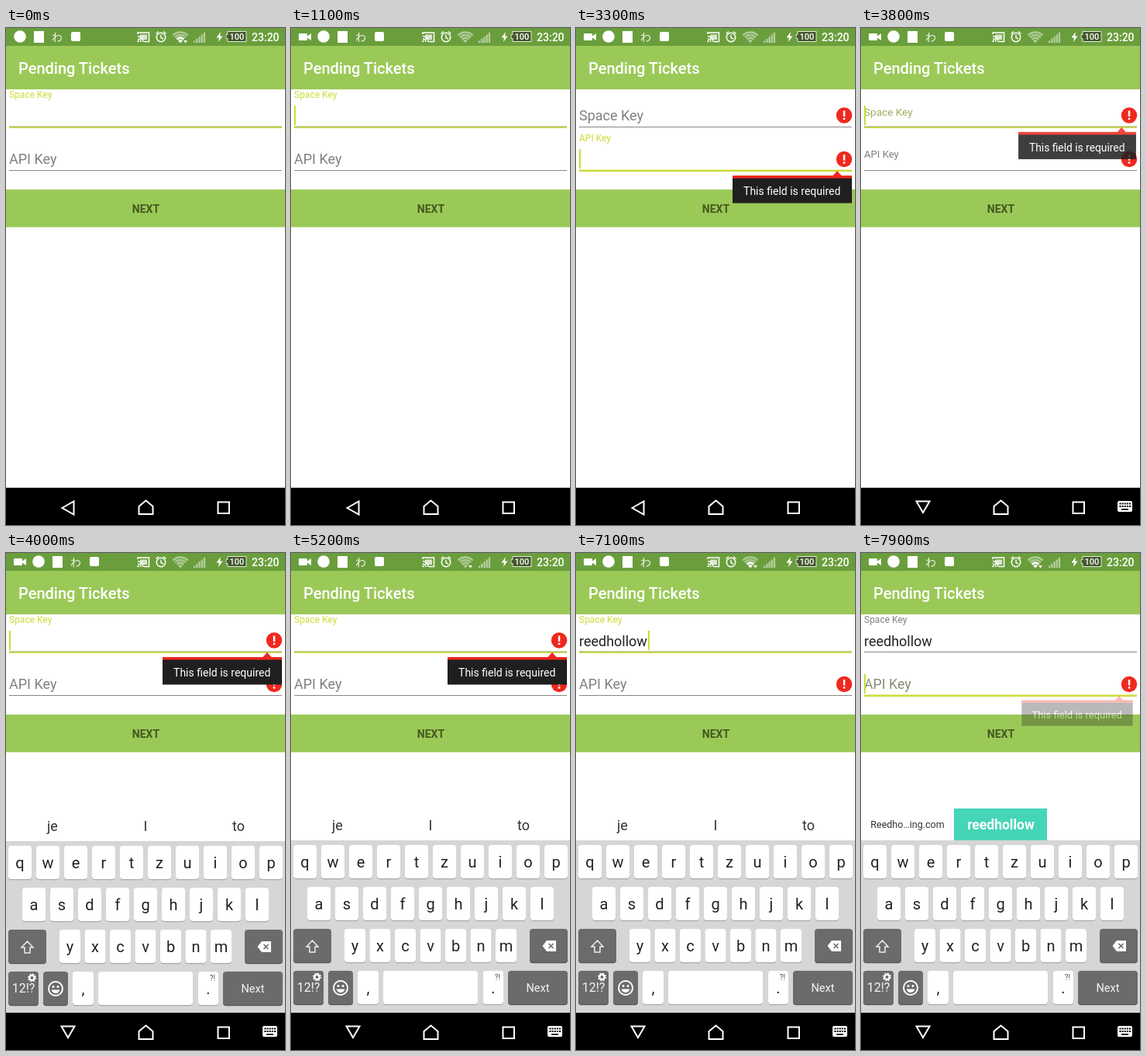
Recreate the animation shown at these times as an HTML page. Size 360 px wide and 640 px high, loop 8000 ms.

```html
<!DOCTYPE html>
<html lang="en">
<head>
<meta charset="utf-8">
<style>
html, body { margin: 0; width: 100%; height: 100%; overflow: hidden; background: #fff; }
svg { display: block; width: 100vw; height: 100vh; font-family: Roboto, sans-serif; }
</style>
</head>
<body>
<svg id="stage" viewBox="0 0 360 640"></svg>
<script>
const LOOP = 8000, STEP = 100;
const GREEN = '#9bc958', LIME = [205, 220, 57], GRAY = [128, 128, 128], RED = '#f0281e';
const TO_API = 2228, TO_SPACE = 3706, API_AGAIN = 7875;

const clamp = x => Math.min(1, Math.max(0, x));
const lerp = (a, b, p) => a + (b - a) * p;
const ramp = (t, start, length) => clamp((t - start) / length);
const within = (t, a, b) => t >= a && t < b;
const mix = (a, b, p) => `rgb(${a.map((v, i) => Math.round(lerp(v, b[i], p)))})`;
const rgb = c => mix(c, c, 0);

// Material "fast out, slow in": cubic-bezier(.4, 0, .2, 1)
function fastOutSlowIn(x) {
  let lo = 0, hi = 1, u = .5;
  for (let i = 0; i < 20; i++) {
    u = (lo + hi) / 2;
    const at = 1.2 * (1 - u) ** 2 * u + .6 * (1 - u) * u * u + u ** 3;
    if (at < x) lo = u; else hi = u;
  }
  return 3 * (1 - u) * u * u + u ** 3;
}

const text = (s, x, y, size, fill, more = '') =>
  `<text x="${x}" y="${y}" font-size="${size}" fill="${fill}" ${more}>${s}</text>`;
const centered = (s, x, y, size, fill, more = '') => text(s, x, y, size, fill, 'text-anchor="middle" ' + more);
const rect = (x, y, w, h, fill, more = '') =>
  `<rect x="${x}" y="${y}" width="${w}" height="${h}" fill="${fill}" ${more}/>`;
const path = (d, fill, more = '') => `<path d="${d}" fill="${fill}" ${more}/>`;
const stroke = (d, width = 2, color = '#fff', more = '') =>
  path(d, 'none', `stroke="${color}" stroke-width="${width}" ${more}`);
const circle = (x, y, r, fill, more = '') => `<circle cx="${x}" cy="${y}" r="${r}" fill="${fill}" ${more}/>`;
const ring = (x, y, r, width, more = '') => circle(x, y, r, 'none', `stroke="#fff" stroke-width="${width}" ${more}`);
const group = (content, more) => `<g ${more}>${content}</g>`;

function wifi(bright, arrow) {
  const arc = (r, alpha) => {
    const d = r * .72;
    return stroke(`M${225 - d} ${19 - d}A${r} ${r} 0 0 1 ${225 + d} ${19 - d}`, 2.6, '#fff', `opacity="${alpha}"`);
  };
  const inner = bright ? 1 : .45;
  return arc(13.2, .45) + arc(9.7, .45) + arc(6.2, inner) +
    path('M225 19.5L222 16Q225 13.8 228 16Z', '#fff', `opacity="${inner}"`) +
    (arrow ? path('M229 16H234L231.5 19.5Z', '#fff') : '');
}

function statusBar(t) {
  const recording = t >= 100;
  const icons = circle(18, 11, 7.8, '#fff') + rect(36, 4, 13, 15, '#fff') +
    centered('わ', 66, 17, 14, '#fff', 'font-family="Noto Sans CJK JP, Noto Sans CJK, sans-serif" opacity=".9"') +
    rect(84, 5, 12, 12, '#fff', 'rx="2"');
  const camera = rect(10, 7, 11, 9, '#fff', 'rx="1"') + path('M21 10.5L26 7V16L21 12.5Z', '#fff');
  const cast = stroke('M170 8V6H184.5V17.5H178', 1.5) + rect(173, 8.5, 9, 6.5, '#fff', 'opacity=".75"') +
    stroke('M170 10.5A7.5 7.5 0 0 1 177 18M170 14A4 4 0 0 1 174 18', 1.5) + circle(170.5, 17, 1.2, '#fff');
  const alarm = ring(200, 12, 5.7, 1.5) +
    stroke('M200 8.5V12.5L203 14M193.5 7.5L197 4.5M206.5 7.5L203 4.5', 1.4);
  let signal = '';
  for (let i = 0; i < 5; i++) signal += rect(242 + i * 3.2, 16.5 - i * 2.7, 2.3, 2.5 + i * 2.7, '#fff', 'opacity=".5"');
  const bolt = path('M277 5L271.5 12.5H275L274 18L279.5 10.5H276Z', '#fff');
  const battery = rect(286, 4.5, 24, 13, '#44582f') + rect(283.5, 8.5, 2.5, 5, '#44582f') +
    stroke('M286 4.5H310V17.5H286V13.5H284V8.5H286Z', 1, '#e2ead8') +
    centered('100', 298, 15, 11, '#fff', 'font-weight="500"');
  const bright = t < 100 || t >= 7000;
  return rect(0, 0, 360, 23, '#6a9e3c') + (recording ? camera : '') +
    group(icons, `transform="translate(${recording ? 24 : 0})"`) +
    cast + alarm + wifi(bright, bright || within(t, 5000, 6000)) + signal + bolt + battery +
    text('23:20', 317, 17, 14, '#fff', 'font-weight="500"');
}

function label(name, bottom, lift, focused) {
  const size = lerp(18, 12, fastOutSlowIn(lift));
  const color = focused ? mix(GRAY, LIME, lift) : rgb(GRAY);
  return text(name, 4, lerp(bottom, bottom - 29, lift * lift), size, color);
}

const fieldEdge = (y, focused) => focused
  ? rect(4, y - .5, 352, 2.5, rgb(LIME)) : rect(4, y, 352, 1, '#858585');

const errorIcon = y => circle(346, y, 10.2, RED) +
  rect(344.8, y - 6, 2.5, 7.5, '#fff') + rect(344.8, y + 3.2, 2.5, 2.5, '#fff');

function popup(t, start, end, dy) {
  const grow = 1 - (1 - ramp(t, start, 150)) ** 2;
  const alpha = grow * (1 - ramp(t, end, 200));
  if (alpha <= 0) return '';
  const body = rect(202, 134, 154, 35.5, '#1f1f1f') + rect(202, 134, 154, 3.5, RED) +
    path('M331 134.5L337 128L343 134.5Z', RED) + centered('This field is required', 278.7, 159.3, 14, '#fff');
  return group(body, `opacity="${alpha}" transform="translate(279 ${129 + dy}) scale(${lerp(.9, 1, grow)}) translate(-279 -129)"`);
}

function cursorVisible(t) {
  const toggles = [100, 600, 1100, 1600, 2100, 2700, 3300, 4200, 4800, 5200, 5700, 6200, 6700];
  return toggles.filter(at => at <= t).length % 2 === 1;
}

function form(t) {
  const apiFocused = within(t, 2200, 3700) || t >= 7700;
  const apiLabel = within(t, TO_API, TO_SPACE) || t >= API_AGAIN;
  const spaceLift = 1 - ramp(t, TO_API, 200) + ramp(t, TO_SPACE, 200);
  const apiLift = ramp(t, TO_API, 200) - ramp(t, TO_SPACE, 200) + ramp(t, API_AGAIN, 200);
  const entered = t >= 6900;
  let out = label('Space Key', 119, spaceLift, !apiLabel) + label('API Key', 175, apiLift, apiLabel);
  out += fieldEdge(127, !apiFocused) + fieldEdge(183, apiFocused);
  if (!apiFocused) out += rect(4, 126.5, 352, 1, '#b4b6a5');
  if (entered) out += text('reedhollow', 4, 120, 18, '#222');
  if (cursorVisible(t)) out += rect(entered && !apiFocused ? 93 : 4, apiFocused ? 156 : 100, 2, 25, rgb(LIME));
  if (within(t, 2200, 6900)) out += errorIcon(112.5);
  if (t >= 2200) out += errorIcon(169);
  return out + rect(0, 208, 360, 48.5, GREEN) +
    centered('NEXT', 180.5, 238, 14, '#44591f', 'font-weight="700"') +
    popup(t, TO_API, 3550, 56) + popup(t, TO_SPACE, 6850, 0) + popup(t, API_AGAIN, LOOP, 56);
}

function key(x, y, w, content = '', dark = false, size = 20) {
  return rect(x, y + 1.2, w, 43, dark ? '#555' : '#aaa', 'rx="4"') +
    rect(x, y, w, 43, dark ? '#6b6b6b' : '#fff', 'rx="4"') +
    centered(content, x + w / 2, y + 21.5 + size * .35, size, dark ? '#f4f4f4' : '#222');
}

const keyRow = (letters, x, y, pitch, w) => [...letters].map((c, i) => key(x + i * pitch, y, w, c)).join('');

function suggestions(t) {
  if (t < 7200) return ['je', 'I', 'to'].map((s, i) => centered(s, 60 + i * 120, 356.5, 18, '#333')).join('');
  return centered('Reedho…ing.com', 60, 354, 12.5, '#333') + rect(120, 329, 120, 41, '#45d5b7') +
    centered('reedhollow', 180.5, 356, 17.5, '#fff', 'font-weight="700"');
}

function keyboard(t) {
  const p = ramp(t, 3830, 250);
  if (!p) return '';
  const shift = stroke('M27.5 499L35 507H31V514H24V507H20Z', 1.5, '#eee');
  const erase = path('M324.5 506L330 499H342V513H330Z', '#fff') +
    stroke('M332.5 503L338.5 509M338.5 503L332.5 509', 1.6, '#6b6b6b');
  const smiley = ring(64, 560, 9, 2) + circle(61, 557.5, 1.5, '#fff') + circle(67, 557.5, 1.5, '#fff') +
    path('M58.5 561.5H69.5Q68 566 64 566T58.5 561.5', '#fff');
  const gear = ring(33.5, 546, 3.2, 2.4) + ring(33.5, 546, 4.7, 1.6, 'stroke-dasharray="1.85 1.84"');
  const keys = keyRow('qwertzuiop', 3, 376, 36, 30) + keyRow('asdfghjkl', 21, 430, 36, 30) +
    key(3, 484, 49, '', true) + keyRow('yxcvbnm', 69, 484, 32.5, 27) + key(308, 484, 49, '', true) +
    key(3, 538, 39, '12!?', true, 16) + key(48, 538, 32, '', true) + key(86, 538, 27, ',') +
    key(119, 538, 122) + key(248, 538, 26, '.') + key(280, 538, 77, 'Next', true, 14.5) +
    centered('?!', 266.5, 549.5, 10, '#555');
  return group(rect(0, 329, 360, 41, '#fff') + rect(0, 370, 360, 250, '#d6d6d6') + suggestions(t) +
    keys + shift + erase + smiley + gear,
    `transform="translate(0 ${Math.round(100 * (1 - p) ** 4)})" opacity="${clamp(p * 2)}"`);
}

function navBar(t) {
  const typing = t >= 3700;
  const back = typing ? 'M71.5 609.5H88.5L80 624Z' : 'M72.5 618L87.5 609.5V626.5Z';
  let out = rect(0, 592, 360, 48, '#000') + stroke(back) +
    stroke('M171.5 626V616L180.5 608.5L189.5 616V626Z') + stroke('M273.5 610.5H288V625H273.5Z');
  if (typing) {
    out += rect(331, 609, 19, 14, '#fff', 'rx="2"') +
      stroke('M333.5 612.5H348M333.5 616H348', 2, '#000', 'stroke-dasharray="2 1.1"') + rect(336, 619, 9, 1.7, '#000');
  }
  return out;
}

const stage = document.getElementById('stage');
let shown = -1;
function frame(now) {
  const t = Math.floor(now % LOOP / STEP) * STEP;
  if (t !== shown) {
    shown = t;
    stage.innerHTML = rect(0, 0, 360, 640, '#fff') + statusBar(t) + rect(0, 23, 360, 56, GREEN) +
      text('Pending Tickets', 16, 59, 20, '#fff', 'font-weight="500"') + form(t) + keyboard(t) + navBar(t);
  }
  requestAnimationFrame(frame);
}
frame(0);
</script>
</body>
</html>
```
